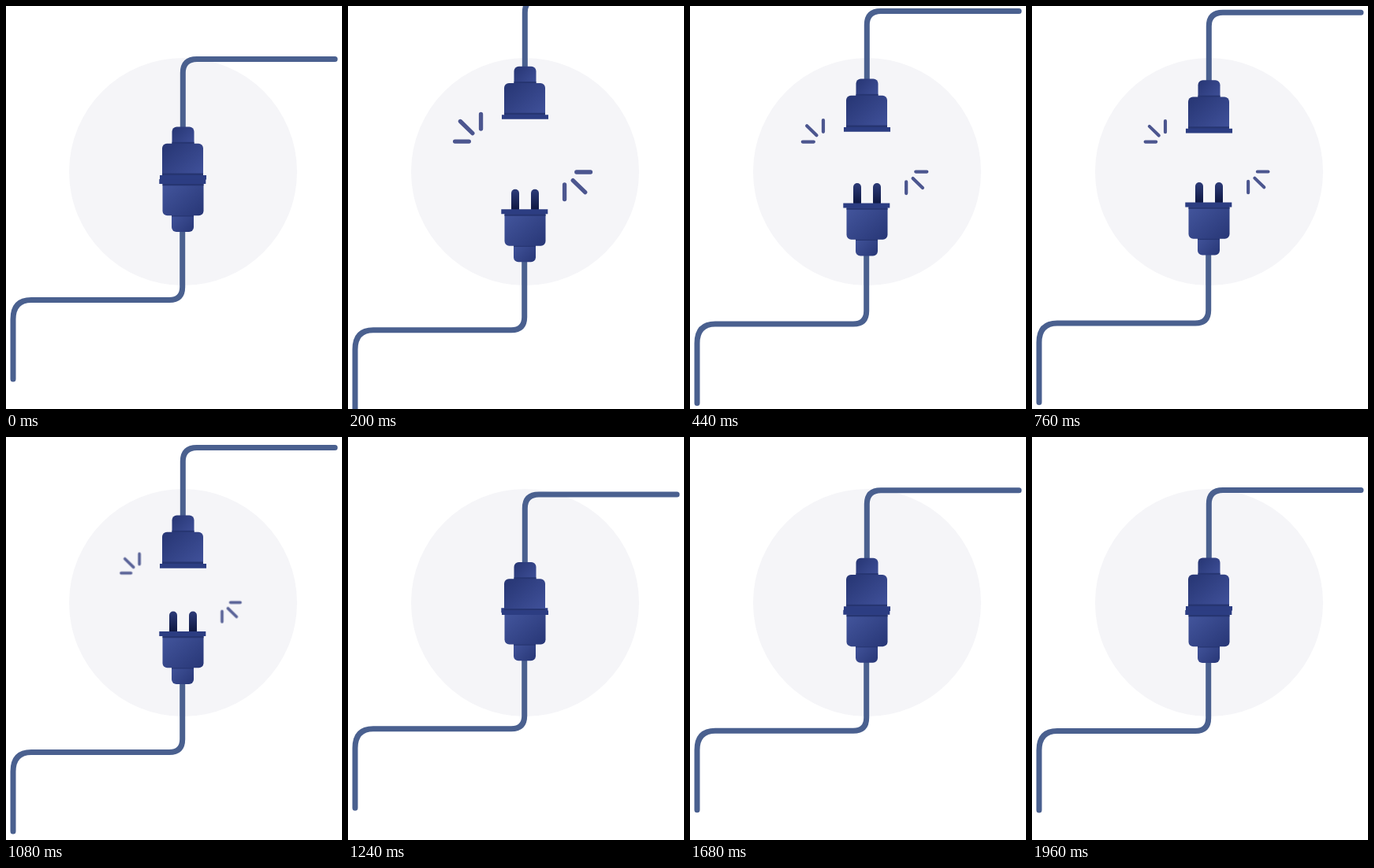
Write an HTML page that moves like this. It is 426 px wide and 512 px high and loops after 2000 ms.

```html
<!DOCTYPE html>
<html lang="en">
<head>
<meta charset="utf-8">
<title>Plug</title>
<style>
  html, body { margin: 0; width: 426px; height: 512px; overflow: hidden; background: #fff; }
  svg { display: block; }
  .cable { fill: none; stroke: #4a608f; stroke-width: 7; stroke-linecap: round; }
  .rays { fill: none; stroke: #4c568f; stroke-width: 4.1; stroke-linecap: round; }
  .shade { fill: #263571; }
  .rim { fill: #2c3d82; }
</style>
</head>
<body>
<svg width="426" height="512" viewBox="0 0 426 512">
  <defs>
    <linearGradient id="rise" x1="0" y1="0" x2="1" y2="1">
      <stop offset=".1" stop-color="#293877"/>
      <stop offset="1" stop-color="#42539d"/>
    </linearGradient>
    <linearGradient id="fall" x1="0" y1="0" x2="1" y2="1">
      <stop offset=".1" stop-color="#42549b"/>
      <stop offset=".95" stop-color="#293878"/>
    </linearGradient>
    <linearGradient id="pin" x1="0" y1="0" x2="0" y2="1">
      <stop offset=".1" stop-color="#2a3873"/>
      <stop offset=".85" stop-color="#0f1842"/>
    </linearGradient>
    <path id="burst" d="M-1.5-28.3V-14M-21.6-21.4L-9.7-9.8M-26.8-1.7H-13.2"/>
  </defs>

  <circle cx="224.5" cy="210.5" r="144.5" fill="#f5f5f8"/>

  <g id="plug">
    <path class="cable" d="M223.7 280V357Q223.7 373.5 207 373.5H32Q9 373.5 9 398V474"/>
    <g fill="url(#pin)">
      <rect x="207" y="194.5" width="10" height="30" rx="5"/>
      <rect x="232" y="194.5" width="10" height="30" rx="5"/>
    </g>
    <rect x="210" y="258" width="28" height="29" rx="6" fill="url(#fall)"/>
    <path class="shade" d="M210 265h28v2.5h-28z"/>
    <rect x="198.5" y="221" width="52" height="45.3" rx="6" fill="url(#fall)"/>
    <path class="shade" d="M198.5 226h52v2.3h-52z"/>
    <path class="rim" d="M194.3 220h59v6h-59z"/>
  </g>

  <g id="socket">
    <path class="cable" d="M224.3 160V85Q224.3 67.5 242 67.5H417"/>
    <rect x="210.5" y="153.5" width="28" height="29" rx="6" fill="url(#rise)"/>
    <path class="shade" d="M210.5 172.8h28v2.5h-28z"/>
    <rect x="198" y="174.7" width="52" height="45" rx="6" fill="url(#rise)"/>
    <path class="shade" d="M198 212.5h52v2.5h-52z"/>
    <path class="rim" d="M195 215h59v5.6h-59z"/>
  </g>

  <g class="rays" id="rays">
    <use href="#burst"/>
    <use href="#burst"/>
  </g>
</svg>
<script>
  const LOOP = 2000, STEP = 40, SPRING = 816, OPEN = 112, CLOSE = 1072, GAP = 59;
  const [plug, socket, rays] = ['plug', 'socket', 'rays'].map(id => document.getElementById(id));
  const [left, right] = rays.children;

  function elastic(ms) {
    const t = ms / SPRING;
    if (t <= 0) return 0;
    if (t >= 1) return 1;
    return 1 + 2 ** (-10 * t) * Math.sin((t - 0.075) * 2 * Math.PI / 0.3);
  }

  function draw() {
    const t = Math.floor(performance.now() % LOOP / STEP) * STEP;
    const open = elastic(t - OPEN) - elastic(t - CLOSE);
    const size = Math.max(0, open);
    socket.setAttribute('transform', `translate(0 ${-GAP * open})`);
    plug.setAttribute('transform', `translate(0 ${GAP / 2 * open})`);
    left.setAttribute('transform', `translate(170.5 174.3) scale(${size})`);
    right.setAttribute('transform', `translate(272.6 208.8) scale(${-size})`);
    rays.setAttribute('opacity', Math.min(1, size));
    requestAnimationFrame(draw);
  }
  draw();
</script>
</body>
</html>
```
